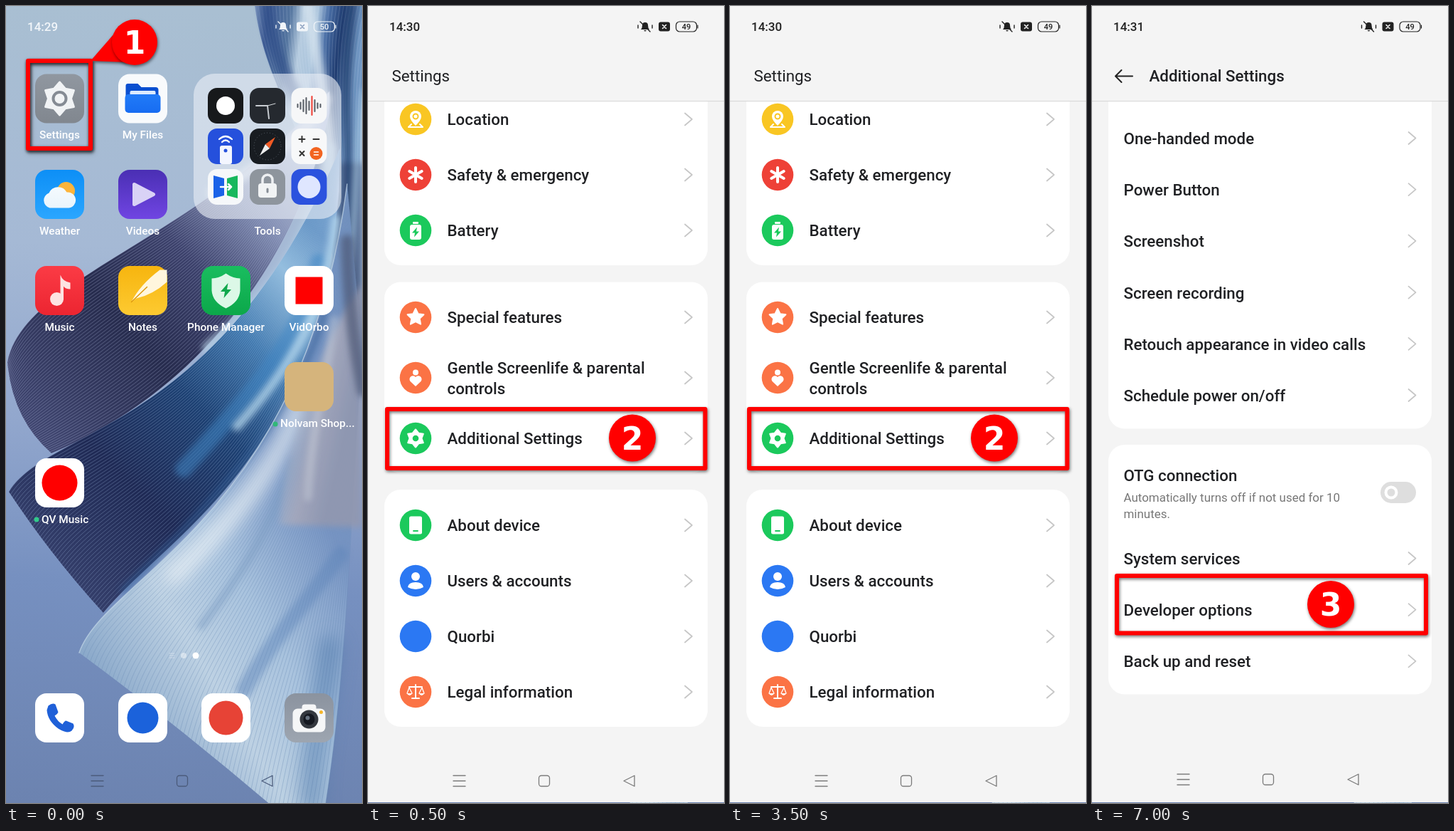
Recreate the animation shown at these times as an HTML page. Size 501 px wide and 1119 px high, loop 8000 ms.

```html
<!DOCTYPE html>
<html lang="en">
<head>
<meta charset="utf-8">
<title>Phone settings walkthrough</title>
<style>
html, body { margin: 0; width: 100%; height: 100%; overflow: hidden; }
svg { display: block; width: 100%; height: 100%; font-family: Roboto, sans-serif; }
.mark { filter: drop-shadow(1px 2px 2px rgba(0, 0, 0, .55)); }
.num { font: bold 44px "DejaVu Sans", sans-serif; fill: #fff; text-anchor: middle; }
</style>
</head>
<body>
<svg id="stage" viewBox="0 0 501 1119"></svg>
<script>
// Markup helpers
const at = (x, y, s) => `<g transform="translate(${x} ${y})">${s}</g>`;
const text = (x, y, s, size = 22.35, weight = 500, fill = '#202124', anchor = 'start') =>
  `<text x="${x}" y="${y}" font-size="${size}" font-weight="${weight}" fill="${fill}" text-anchor="${anchor}">${s}</text>`;
const rect = (x, y, w, h, r, fill, more = '') =>
  `<rect x="${x}" y="${y}" width="${w}" height="${h}" rx="${r}" fill="${fill}" ${more}/>`;
const disc = (x, y, r, fill, more = '') => `<circle cx="${x}" cy="${y}" r="${r}" fill="${fill}" ${more}/>`;
const shape = (d, fill, more = '') => `<path d="${d}" fill="${fill}" ${more}/>`;
const line = (d, color, w, more = '') =>
  `<path d="${d}" fill="none" stroke="${color}" stroke-width="${w}" stroke-linecap="round" stroke-linejoin="round" ${more}/>`;

const blur = (id, size) => `<filter id="${id}" filterUnits="userSpaceOnUse" x="-100" y="-100" width="700" height="1320">
  <feGaussianBlur stdDeviation="${size}"/></filter>`;
let defs = blur('soft', 12) + blur('hazy', 4);
const glow = (d, color, w, opacity, filter = 'hazy') => line(d, color, w, `opacity="${opacity}" filter="url(#${filter})"`);

let ids = 0;
// Linear gradient in stage units; stops are "color offset" pairs.
function grad(x1, y1, x2, y2, stops) {
  const id = 'g' + ids++;
  const list = stops.split(',').map(s => {
    const [color, offset] = s.trim().split(' ');
    return `<stop offset="${offset}" stop-color="${color}"/>`;
  }).join('');
  defs += `<linearGradient id="${id}" gradientUnits="userSpaceOnUse" x1="${x1}" y1="${y1}" x2="${x2}" y2="${y2}">${list}</linearGradient>`;
  return `url(#${id})`;
}

function star(n, R, r) {
  let d = '';
  for (let i = 0; i < 2 * n; i++) {
    const a = Math.PI * i / n, k = i % 2 ? r : R;
    d += `${i ? 'L' : 'M'}${(k * Math.sin(a)).toFixed(2)} ${(-k * Math.cos(a)).toFixed(2)}`;
  }
  return d + 'Z';
}
const bolt = 'M2 -7L-5 1H-1L-2 7L5 -1H1Z';

// Pleated sheet: area between two cubic curves with evenly blended lines.
function fan(a, b, n, fill, stroke, bulge = [0, 0]) {
  const curve = p => `M${p[0]} ${p[1]}C${p.slice(2)}`;
  const back = [b[4], b[5], b[2], b[3], b[0], b[1]];
  const mx = (a[0] + b[0]) / 2 + 2 * bulge[0], my = (a[1] + b[1]) / 2 + 2 * bulge[1];
  let d = '';
  for (let i = 0; i <= n; i++) {
    const t = i / n, k = 4 * t * (1 - t);
    d += curve(a.map((v, j) => +(v + (b[j] - v) * t + (j < 2 ? bulge[j] * k : 0)).toFixed(1)));
  }
  return shape(`${curve(a)}L${b[6]} ${b[7]}C${back}Q${mx} ${my} ${a[0]} ${a[1]}Z`, fill) + line(d, stroke, .9);
}

function wallpaper() {
  const sky = grad(120, 0, 60, 1119, '#a9bfd2 0,#a5b9d5 .3,#92a7cd .52,#7690c0 .72,#6c83b0 1');
  const ribbons = fan([350, 0, 365, 110, 420, 170, 436, 260], [520, 0, 480, 150, 515, 300, 480, 430], 34,
    grad(352, 0, 501, 20, '#7790ba 0,#3f5c94 .12,#54759f .33,#b5cbdf .45,#aac4dc .58,#4a6fa6 .68,#203c70 .82,#7096c2 1'), '#dbe8f533')
    + shape('M470 220Q470 340 440 450L501 480V220Z', '#53698f', 'filter="url(#hazy)"')
    + glow('M366 0C378 90 420 140 446 200', '#2e4d88', 18, .7)
    + glow('M425 0C440 100 455 150 458 260', '#d5e3ee', 16, .8)
    + glow('M486 0C470 130 490 220 478 330', '#24406f', 12, .75)
    + glow('M503 120C488 230 497 300 474 420', '#a9cbe4', 8, .7);
  const upper = fan([2, 500, 25, 380, 270, 330, 455, 120], [64, 628, 230, 560, 400, 400, 455, 150], 48,
    grad(30, 570, 440, 190, '#3f456f 0,#272c4e .33,#3c416b .56,#7f8bb0 .76,#c5d2e4 1'), '#b4bee05c', [-12, 8])
    + glow('M290 262C350 230 420 190 450 130', '#dfe6ef', 16, .75)
    + glow('M455 200C435 330 370 410 285 480', '#b4cde3', 18, .75);
  const middle = fan([4, 682, 60, 590, 300, 600, 470, 200], [137, 852, 230, 740, 440, 640, 468, 260], 48,
    grad(40, 740, 450, 330, '#333d69 0,#1f2a55 .25,#1d4173 .5,#3f78ae .7,#91bddd .88,#5c8fc0 1'), '#a9c3e655', [-3, 3])
    + glow('M440 360C420 470 330 560 250 650', '#3f86c4', 24, .55)
    + glow('M464 300C450 430 400 510 325 590', '#b2d5ec', 13, .8);
  const lower = fan([103, 908, 140, 800, 420, 720, 480, 250], [440, 1180, 480, 950, 480, 800, 501, 480], 64,
    grad(140, 960, 470, 760, '#8ba9ca 0,#bdd1e3 .35,#a9c3de .62,#7895c4 1'), '#6889b466', [0, -6])
    + glow('M448 430C410 570 300 690 165 820', '#2d5b94', 9, .55)
    + glow('M415 560C375 660 310 730 235 800', '#f0f5f8', 26, .75, 'soft')
    + glow('M405 640C370 740 330 800 275 870', '#7f9fc4', 12, .55)
    + glow('M470 770C430 830 380 880 335 960', '#5f85b9', 22, .5)
    + glow('M430 1119C430 1050 445 990 455 900', '#4a74a8', 34, .5, 'soft')
    + line('M103 908C140 800 420 720 480 250', '#d3e5f1', 1.5, 'opacity=".6"');
  const silver = shape('M501 390C445 470 392 600 385 728L501 732Z',
    grad(385, 600, 470, 620, '#b0bccd00 0,#a6a8bb .55,#9298b0 1'), 'opacity=".9" filter="url(#hazy)"')
    + glow('M480 330Q482 440 503 540', '#4d5976', 18, .7)
    + glow('M462 440C450 530 430 590 425 690', '#c9cfda', 10, .5);
  return rect(0, 0, 501, 1119, 0, sky) + ribbons + upper + middle + lower + silver;
}

// Shared phone chrome
function status(time, charge, color, cut, dx = 0) {
  return text(30, 35, time, 17, 500, color)
    + at(390 + dx, 29, shape('M-6 4Q-4 2 -4 -2A4 4 0 0 1 4 -2Q4 2 6 4ZM-2 5H2Q0 8 -2 5Z', color)
      + line('M-7 -7L7 7', color, 1.4) + line('M-10 -2V2M10 -2V2', color, 1.4))
    + at(417 + dx, 29, rect(-8, -6.5, 16, 13, 3, color) + line('M-2.5 -2.5L2.5 2.5M2.5 -2.5L-2.5 2.5', cut, 1.6))
    + at(448 + dx, 29, rect(-14.5, -7, 29, 14, 5, 'none', `stroke="${color}" stroke-width="1.2"`)
      + line('M16 -2V2', color, 1.2) + text(0, 4, charge, 11, 500, color, 'middle'));
}
const nav = (y, color) => at(0, y, line('M120 -7.5H137M120 0H137M120 7.5H137', color, 1.3)
  + rect(240.5, -7.5, 15, 15, 3.5, 'none', `stroke="${color}" stroke-width="1.3"`)
  + line('M360 0L375 -7.5V7.5Z', color, 1.3));
const frame = (x, y, w, h) => rect(x, y, w, h, 0, 'none', 'stroke="#f00" stroke-width="6" stroke-linejoin="round" class="mark"');
const badge = (x, y, n, r = 33) => disc(x, y, r, '#f00', 'class="mark"') + `<text class="num" x="${x}" y="${y + 16}">${n}</text>`;

// Home screen
const tile = (x, y, fill, art) => at(x, y, rect(-34.5, -34.5, 69, 69, 16, fill) + art);
const mini = (x, y, fill, art) => at(x, y, rect(-25, -25, 50, 50, 13, fill) + art);
const label = (x, y, s, anchor = 'middle') => text(x, y, s, 15.4, 500, '#fff', anchor);

function home() {
  const cols = [75.5, 192.5, 309.5, 426.5];
  const down = (a, b) => grad(0, -34, 0, 34, `${a} 0,${b} 1`);
  const bars = [4, 9, 16, 22, 12, 26, 16, 7, 4].map((h, i) => {
    const x = -16 + i * 4;
    return line(`M${x} ${-h / 2}V${h / 2}`, i === 5 ? '#ee3b30' : '#555b63', 2);
  }).join('');
  const apps = [
    [0, 130, 'Settings', down('#9097a0', '#81878f'),
      shape(star(6, 23, 16), '#f1f3f5', 'stroke="#f1f3f5" stroke-width="3" stroke-linejoin="round"')
      + disc(0, 0, 9, '#f1f3f5', 'stroke="#858b94" stroke-width="4"')],
    [1, 130, 'My Files', '#f8fafc',
      shape('M-24 -18Q-24 -21 -21 -21H-7L-2 -16H18Q22 -16 22 -12V10H-24Z', '#0a4fd0')
      + rect(-18, -11, 36, 18, 2, '#dcebff') + rect(-25, -6, 50, 26, 5, down('#2b8bff', '#1264ee'))],
    [0, 264.5, 'Weather', down('#0d8ff6', '#2ba6ff'),
      disc(9, -5, 12.5, '#fdb43a')
      + shape('M-14 19A11 11 0 0 1 -15 -2A14 14 0 0 1 10 -3A11 11 0 0 1 13 19Z', down('#ffffff', '#e3f1fb'))],
    [1, 264.5, 'Videos', down('#4a2fb4', '#7045e2'),
      line('M-12 -14V14L15 0Z', '#d9d2f6', 5) + shape('M-12 -14V14L15 0Z', '#d9d2f6')],
    [0, 399.5, 'Music', down('#fb3b45', '#ec2531'),
      disc(-4, 12, 9.5, '#fde3e2') + shape('M1 13V-22Q4 -13 15 -11V-2Q8 -2 5.5 -6V13Z', '#fde3e2')],
    [1, 399.5, 'Notes', down('#f7b50f', '#fdca31'),
      shape('M34 -29L34 -12Q14 6 -9 11L-16 16Q-4 -8 24 -29Z', '#fff6dd') + line('M-16 16L6 -5', '#dd980c', 1.5)],
    [2, 399.5, 'Phone Manager', down('#19bd5f', '#0ca84a'),
      shape('M0 -24Q10 -17 20 -17V0Q19 16 0 25Q-19 16 -20 0V-17Q-10 -17 0 -24Z', '#dcf8e7')
      + `<g transform="scale(1.5)">${shape(bolt, '#10a84d')}</g>`],
    [3, 399.5, 'VidOrbo', '#fff', rect(-19, -19, 38, 38, 0, '#f00')],
    [3, 534.5, '', '#d5b47c', ''],
    [0, 669.5, '', '#fff', disc(0, 0, 25, '#f00')],
    [0, 999.5, '', '#fff',
      shape('M-16 -17Q-10 -22 -6 -19L-2 -8Q-3 -5 -7 -3Q-3 5 4 9Q7 4 9 4L19 8Q22 13 17 18Q11 23 -2 15Q-17 4 -18 -11Z', '#1f60d8')],
    [1, 999.5, '', '#fff', disc(0, 0, 22, '#1b62db')],
    [2, 999.5, '', '#fff', disc(0, 0, 24, '#e74336')],
    [3, 999.5, '', down('#8b939f', '#9da5b0'),
      rect(-23, -13, 46, 33, 7, '#f5f6f7') + rect(-10, -19, 20, 12, 4, '#f5f6f7')
      + disc(0, 2, 13, '#34383f') + disc(0, 2, 8, '#151820') + disc(-2, 0, 3, '#65707e') + disc(17, -8, 2.5, '#f5b52a')]
  ];
  const calc = line('M-14 -10H-6M-10 -14V-6M6 -10H14M-13 7L-7 13M-7 7L-13 13', '#333', 2)
    + disc(10, 10, 9, '#f26420') + line('M7 8H13M7 12H13', '#fff', 1.5);
  const tools = [
    ['#17191b', disc(0, 0, 13, '#fff')],
    ['#25292f', line('M-16 0H0L2 18', '#c7cbd0', 2) + line('M0 0L11 -3', '#d9dde0', 1)],
    ['#f6f7f8', bars],
    ['#2550dc', rect(-8, -1, 17, 26, 3, '#f3f6ff') + disc(0, 6, 2.5, '#2550dc')
      + line('M-9 -10Q0 -18 9 -10M-5 -6Q0 -11 5 -6', '#fff', 2.2)],
    ['#181c21', disc(0, 0, 19, 'none', 'stroke="#58616a" stroke-dasharray="1 3"')
      + shape('M11 -13L3 3L-3 -3Z', '#f05a24') + shape('M-11 13L3 3L-3 -3Z', '#eee')],
    ['#f7f8f9', calc],
    ['#f6f8fa', shape('M-17 -16L-2 -12V12L-17 16Z', '#1a62e8') + shape('M17 -16L2 -12V12L17 16Z', '#18b85d')
      + line('M-7 0H8M4 -4L8 0L4 4', '#fff', 2.5)],
    ['#8e959d', line('M-7 -4V-10A7 7 0 0 1 7 -10V-4', '#eef0f2', 3.5) + rect(-13, -5, 26, 20, 4, '#f1f3f4')
      + line('M0 3V7', '#858c94', 3)],
    ['#2b52de', disc(0, 0, 16, '#dfe6ff')]
  ];
  return wallpaper() + status('14:29', 50, '#f1f5f9', '#8ba0bf')
    + rect(264, 95, 208, 204, 30, '#e8edf5', 'opacity=".62"')
    + tools.map(([fill, art], i) => mini([309, 368, 426.5][i % 3], 140 + 57 * (i / 3 | 0), fill, art)).join('')
    + label(368, 321, 'Tools')
    + apps.map(([c, y, name, fill, art]) => tile(cols[c], y, fill, art) + label(cols[c], Math.round(y + 56), name)).join('')
    + disc(379, 587, 3.5, '#31b878') + label(386, 591, 'Nolvam Shop...', 'start')
    + disc(43, 721, 3.5, '#31c98a') + label(50, 726, 'QV Music', 'start')
    + line('M230 909H237M230 912H237M230 915H237', '#ffffff66', 1) + disc(250, 912, 4, '#ffffff77') + disc(267, 912, 4.5, '#fff')
    + nav(1088, '#4b5b7b')
    + `<g class="mark">${frame(31, 77, 88, 123)}${shape('M119 77L153 38L172 79Z', '#f00')}</g>` + badge(181, 51, 1, 32);
}

// Settings screens
const chevron = (y, x = 446) => line(`M${x} ${y - 8.5}L${x + 10} ${y}L${x} ${y + 8.5}`, '#c6c6c6', 1.7);
const card = (y, end) => rect(23, y, 455, end - y, 23, '#fff');
const page = (id, body) => `<g id="${id}" display="none">${rect(0, 0, 501, 1118, 0, '#f4f4f4')}${body}</g>`;
const header = rect(0, 0, 501, 133, 0, '#f4f4f4') + rect(0, 133, 501, 1.2, 0, '#dadada');

function settings() {
  const [yellow, red, green, orange, blue] = ['#f9c623', '#ee4137', '#1bc95c', '#fb7345', '#2b78f3'];
  const w = '#fff';
  const gear = shape(star(6, 12.5, 8.5), w, 'stroke="#fff" stroke-width="2" stroke-linejoin="round"') + disc(0, 0, 4.3, green);
  const rows = [
    [159, yellow, 'Location', line('M-6 7L-10 11H10L6 7', w, 2)
      + shape('M0 9Q-8 1 -8 -4A8 8 0 0 1 8 -4Q8 1 0 9Z', w) + disc(0, -4, 3.5, w, `stroke="${yellow}" stroke-width="2"`)],
    [237, red, 'Safety &amp; emergency', line('M0 -10V10M-8.7 -5L8.7 5M-8.7 5L8.7 -5', w, 4)],
    [315, green, 'Battery', rect(-4, -12, 8, 3, 1, w) + rect(-8, -8, 16, 21, 3, w) + at(0, 2.5, shape(bolt, green))],
    [437, orange, 'Special features', shape(star(5, 12, 6), w, 'stroke="#fff" stroke-width="2" stroke-linejoin="round"')],
    [522, orange, '', disc(0, -7.5, 4, w) + shape('M0 12L-7.5 5A4.6 4.6 0 0 1 0 -1A4.6 4.6 0 0 1 7.5 5Z', w)],
    [607, green, 'Additional Settings', gear],
    [729, green, 'About device', rect(-9, -12.5, 18, 25, 2.5, w) + line('M-3 8H3', green, 1.8)],
    [807, blue, 'Users &amp; accounts', disc(0, -6, 6, w) + shape('M-11 9Q-10 2 0 2Q10 2 11 9Q6 12 0 12Q-6 12 -11 9Z', w)],
    [885, blue, 'Quorbi', ''],
    [963, orange, 'Legal information', line('M0 -10V9M-5 9H5M-9 -7H9', w, 2)
      + line('M-9 -6L-12 2M-9 -6L-5 2M9 -6L5 2M9 -6L12 2', w, 1.3)
      + shape('M-12.5 2H-4.5Q-8.5 8 -12.5 2ZM4.5 2H12.5Q8.5 8 4.5 2Z', w)]
  ];
  return page('settings', card(100, 364) + card(387.5, 656) + card(679, 1012) + header
    + status('14:30', 49, '#222', '#f4f4f4') + text(33.5, 106, 'Settings', 22.35, 400)
    + rows.map(([y, color, name, art]) => at(67, y, disc(0, 0, 22.3, color) + art) + text(111.5, y + 8, name) + chevron(y)).join('')
    + text(111.5, 516, 'Gentle Screenlife &amp; parental') + text(111.5, 545, 'controls')
    + nav(1088, '#7b7b7b') + frame(27, 566, 447.5, 83) + badge(372, 606.5, 2));
}

function additional() {
  const first = ['One-handed mode', 'Power Button', 'Screenshot', 'Screen recording',
    'Retouch appearance in video calls', 'Schedule power on/off'];
  const last = ['System services', 'Developer options', 'Back up and reset'];
  const list = (names, y0) => names.map((name, i) => {
    const y = y0 + 72.2 * i;
    return text(44.5, y + 8, name) + chevron(y - .5, 445.5);
  }).join('');
  return page('additional', card(100, 593.5) + card(616, 966.5) + header
    + status('14:31', 49, '#222', '#f4f4f4', -.5)
    + line('M57 98.5H33.5M41.5 90L33 98.5L41.5 107', '#222', 2) + text(80.5, 106, 'Additional Settings')
    + list(first, 186) + list(last, 776) + text(44.5, 667, 'OTG connection')
    + text(44.5, 696, 'Automatically turns off if not used for 10', 16.95, 400, '#777')
    + text(44.5, 719, 'minutes.', 16.95, 400, '#777')
    + rect(406, 668, 50, 30, 15, '#dedede') + disc(421, 683, 7.5, 'none', 'stroke="#fff" stroke-width="4"')
    + nav(1086, '#7b7b7b') + frame(35, 800, 435, 80.5) + badge(336, 840, 3));
}

const stage = document.getElementById('stage');
const body = home() + settings() + additional();
stage.innerHTML = `<defs>${defs}</defs>${body}`;
const pages = ['settings', 'additional'].map(id => document.getElementById(id));
const start = performance.now();

function draw() {
  const t = (performance.now() - start) % 8000;
  const current = t < 500 ? -1 : t < 5500 ? 0 : 1;
  pages.forEach((p, i) => p.setAttribute('display', i === current ? 'inline' : 'none'));
  requestAnimationFrame(draw);
}
draw();
</script>
</body>
</html>
```
